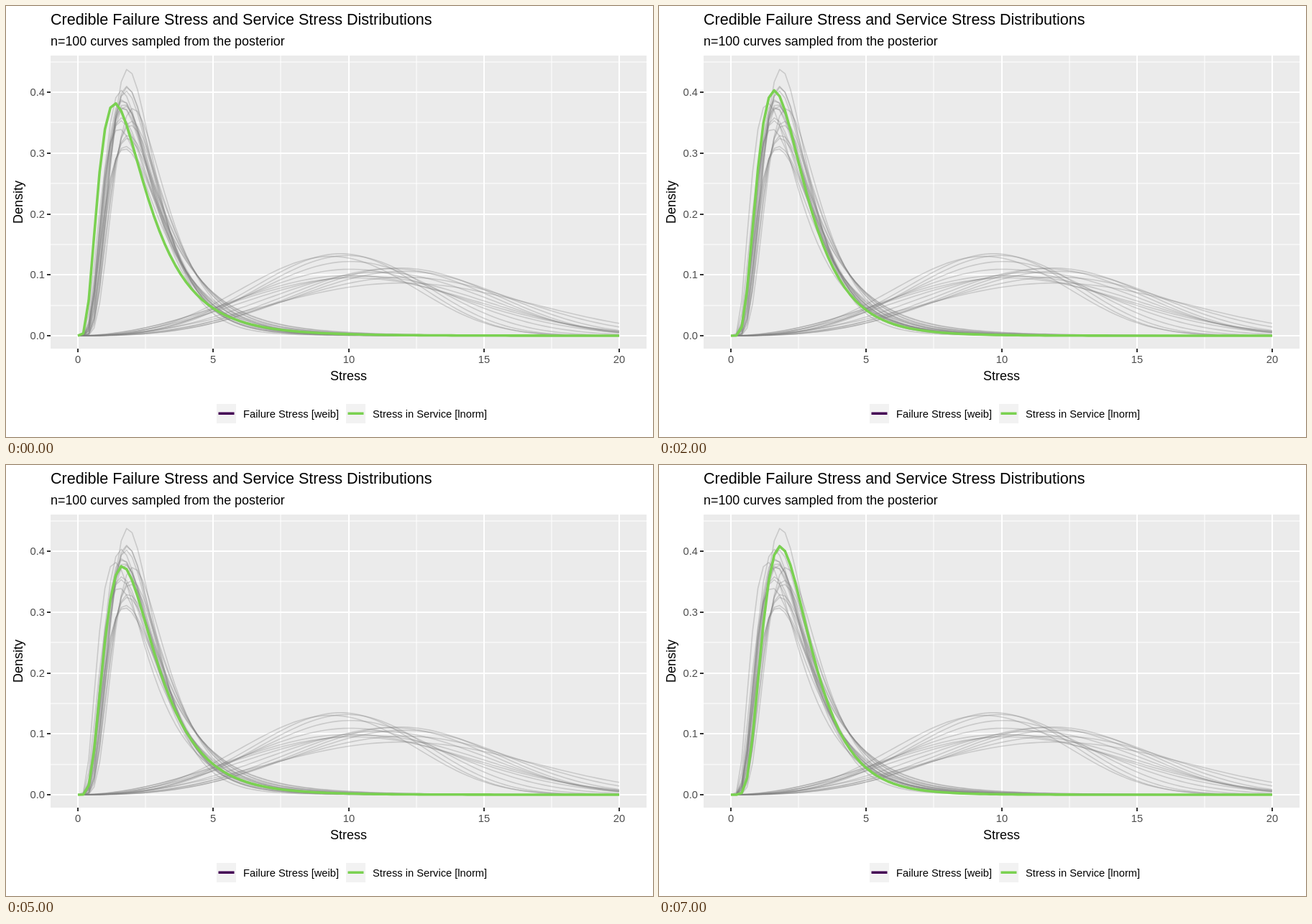
These frames come from a looping animation (900 by 600 pixels, 8000 ms). An HTML page with a canvas:

```html
<!DOCTYPE html>
<html lang="en">
<head>
<meta charset="utf-8">
<title>Stress distributions</title>
<style>
html, body { margin: 0; width: 100%; height: 100%; overflow: hidden; background: #fff; }
canvas { display: block; }
</style>
</head>
<body>
<canvas id="stage" width="900" height="600"></canvas>
<script>
const ctx = document.getElementById('stage').getContext('2d');
const GREEN = '#7AD151', PURPLE = '#440154', GREY = 'rgba(127,127,127,.31)', STEP = 1000;
const px = x => 100 + x * 37.65;
const py = d => 459 - d * 847.5;

const lnorm = (mu, s) => x => x === 0 ? 0 :
  Math.exp(-(((Math.log(x) - mu) / s) ** 2) / 2) / (x * s * Math.sqrt(2 * Math.PI));
const weibull = (k, scale) => x =>
  k / scale * (x / scale) ** (k - 1) * Math.exp(-((x / scale) ** k));

// Service curves highlighted in turn: mean and deviation of the log
const highlights = [
  lnorm(.704, .63), lnorm(.785, .544), lnorm(.757, .536), lnorm(.836, .526),
  lnorm(.8, .5355), lnorm(.803, .555), lnorm(.811, .4475), lnorm(.828, .479)
];

// Remaining draws: spread grows evenly, the other parameter swings around its mean
const draws = Array.from({ length: 14 }, (_, i) => {
  const scale = 10.3 + .26 * i;
  return [
    weibull(3.3 + .45 * Math.cos(2 * Math.PI * (scale - 10.7) / 2.2), scale),
    lnorm(.875 + .08 * Math.cos(Math.PI / 2 * (i + .5)), .47 + .0125 * i)
  ];
}).flat();

function curve(density, color, width) {
  ctx.beginPath();
  for (let i = 0; i <= 100; i++) ctx.lineTo(px(i / 5), py(density(i / 5)));
  ctx.strokeStyle = color;
  ctx.lineWidth = width;
  ctx.stroke();
}

function rect(color, x, y, w, h) {
  ctx.fillStyle = color;
  ctx.fillRect(x, y, w, h);
}

function text(str, x, y, size, color = '#000', align = 'left') {
  ctx.font = `${size}px "Liberation Sans", Arial, sans-serif`;
  ctx.fillStyle = color;
  ctx.textAlign = align;
  ctx.fillText(str, x, y);
}

function legendKey(x, color, label) {
  rect('#F2F2F2', x, 554, 27, 27);
  rect(color, x + 2.5, 565.5, 22, 3.5);
  text(label, x + 37, 573, 14.7);
}

function axes() {
  rect('#EBEBEB', 62, 69, 829, 408);
  for (let i = 0; i < 5; i++) {
    if (i < 4) rect('#fff', Math.round(px(i * 5 + 2.5)) - .5, 69, 1, 408);
    rect('#fff', 62, Math.round(py(i / 10 + .05)) - .5, 829, 1);
  }
  for (let i = 0; i < 5; i++) {
    const x = Math.round(px(i * 5)), y = Math.round(py(i / 10));
    rect('#fff', x - 1, 69, 2, 408);
    rect('#fff', 62, y - 1, 829, 2);
    rect('#333', x - 1, 477, 2, 5);
    rect('#333', 57, y - 1, 5, 2);
    text(i * 5, x, 497, 14.7, '#4D4D4D', 'center');
    text((i / 10).toFixed(1), 54, y + 5, 14.7, '#4D4D4D', 'right');
  }
}

function labels() {
  text('Credible Failure Stress and Service Stress Distributions', 62, 26, 21.55);
  text('n=100 curves sampled from the posterior', 62, 55, 17.9);
  text('Stress', 476.5, 521, 18, '#000', 'center');
  ctx.save();
  ctx.translate(23, 273);
  ctx.rotate(-Math.PI / 2);
  text('Density', 0, 0, 18, '#000', 'center');
  ctx.restore();
  legendKey(293, PURPLE, 'Failure Stress [weib]');
  legendKey(473, GREEN, 'Stress in Service [lnorm]');
}

function draw(now) {
  rect('#fff', 0, 0, 900, 600);
  axes();
  labels();
  ctx.lineJoin = 'round';
  for (const density of [...draws, ...highlights]) curve(density, GREY, 1.6);
  curve(highlights[Math.floor(now / STEP) % highlights.length], GREEN, 3.56);
  requestAnimationFrame(draw);
}
requestAnimationFrame(draw);
</script>
</body>
</html>
```
